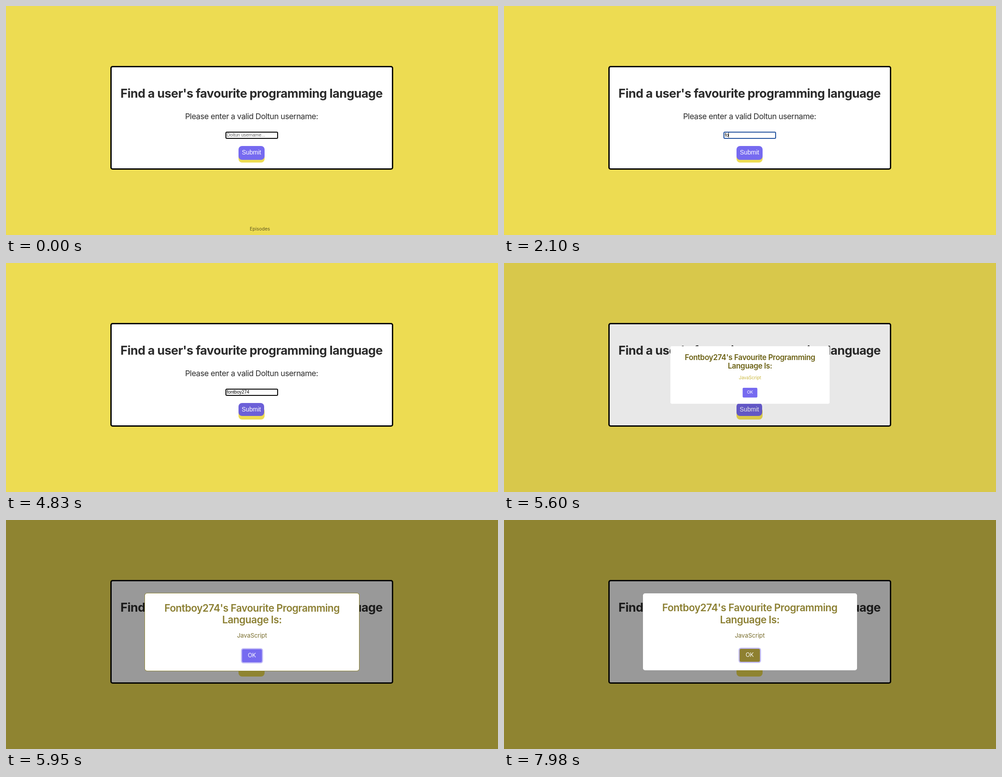
Recreate the animation shown at these times as an HTML page. Size 1094 by 512 pixels, loop 8000 ms.

```html
<!DOCTYPE html>
<html lang="en">
<head>
<meta charset="utf-8">
<title>Favourite language</title>
<style>
* { box-sizing: border-box; margin: 0; }
html, body { width: 100%; height: 100%; overflow: hidden; }
body { position: relative; background: #eddc52; font-family: Inter, sans-serif; color: #2b2b2b; }
body > *, #popup > *, #submit > * { position: absolute; }
.text { white-space: nowrap; text-align: center; }
#card { left: 232px; top: 134px; width: 629px; height: 232px; background: #fff; border: 3px solid #000; border-radius: 5px; }
#heading { left: 232px; top: 176px; width: 628px; font: 700 27px/40px Inter, sans-serif; letter-spacing: -.02em; }
#prompt { left: 232px; top: 232px; width: 628px; font-size: 17.5px; line-height: 29px; letter-spacing: -.026em; }
#field { left: 488px; top: 281px; width: 117px; height: 16px; padding-left: 1px; background: #fff; border: 2px solid #000; border-radius: 3px; font: 10.1px/12px "Liberation Sans", Arial, sans-serif; white-space: pre; }
#value { display: inline-block; height: 12px; }
#caret { display: inline-block; width: 1px; height: 11px; background: #000; vertical-align: top; }
#submit { left: 517px; top: 313px; width: 58px; height: 37px; }
#shade { left: 0; top: 10px; width: 58px; height: 27px; background: #eddc52; border-radius: 8px; }
#face { left: 0; top: 0; width: 58px; height: 31px; border-radius: 8px; color: #fff; font: 13.8px/30px "Liberation Sans", Arial, sans-serif; }
#label { left: 542px; top: 490px; font-size: 10.3px; line-height: 16px; letter-spacing: .1px; color: #5f5720; }
#dim { inset: 0; background: #000; }
#popup { left: 308.5px; top: 163.5px; width: 476px; height: 172.5px; background: #fff; border-radius: 4.7px; }
#title { left: 0; top: 19.5px; width: 476px; font-size: 22.4px; font-weight: 600; line-height: 26.8px; letter-spacing: -.022em; }
#answer { left: 0; top: 84px; width: 476px; font-size: 13.5px; line-height: 20px; letter-spacing: -.01em; }
#ok { left: 215.5px; top: 124.5px; width: 44.5px; height: 29px; border-radius: 3px; color: #fff; font-size: 12.8px; line-height: 28.5px; letter-spacing: -.3px; }
</style>
</head>
<body>
<div id="card"></div>
<div id="heading" class="text">Find a user's favourite programming language</div>
<div id="prompt" class="text">Please enter a valid Doltun username:</div>
<div id="field"><span id="value"></span><span id="caret"></span></div>
<div id="submit"><div id="shade"></div><div id="face" class="text">Submit</div></div>
<div id="label" class="text">Episodes</div>
<div id="dim"></div>
<div id="popup">
  <div id="title" class="text">Fontboy274's Favourite Programming<br>Language Is:</div>
  <div id="answer" class="text">JavaScript</div>
  <div id="ok" class="text">OK</div>
</div>
<script>
const LOOP = 8000, STEP = 70, OPEN = 5600, HOVER_OK = 7070;
const user = 'fontboy274';
const keyTimes = [2100, 2100, 2240, 2380, 2870, 2940, 3080, 3290, 3430, 3560];
const bounce = [.744, 1.014, 1.02, .952, .998, 1];
const style = id => document.getElementById(id).style;
const within = (t, a, b) => t >= a && t < b;
const show = (id, on) => style(id).visibility = on ? 'visible' : 'hidden';

function draw(t) {
  const typed = user.slice(0, keyTimes.filter(k => k <= t).length);
  const value = document.getElementById('value');
  value.textContent = typed || 'Doltun username...';
  value.style.color = typed ? '#000' : '#666';
  // The caret stands before the placeholder, after typed text
  style('caret').position = typed ? 'static' : 'absolute';
  style('caret').left = '1px';
  show('caret', within(t, 1260, 1760) || within(t, 2100, 4060));
  style('field').borderColor = within(t, 1260, 4550) ? '#1f4f9c' : '#000';
  show('label', t < STEP);

  const step = Math.floor((t - OPEN) / STEP);
  const open = step >= 0, settled = step > 0;
  const hover = t >= 4340, pressed = within(t, 4550, 4760);
  const face = style('face');
  face.background = settled ? '#eddc52' : hover ? '#6c60d8' : '#766af0';
  face.height = hover ? '29px' : '31px';
  face.width = hover ? '57px' : '58px';
  face.transform = pressed ? 'translateY(4px)' : 'none';

  style('dim').opacity = settled ? .4 : open ? .09 : 0;
  show('popup', open);
  if (!open) return;
  const popup = style('popup');
  popup.transform = `scale(${bounce[Math.min(step, bounce.length - 1)]})`;
  popup.boxShadow = settled && t < HOVER_OK ? '0 0 0 1px #8e8431' : 'none';
  style('title').color = settled ? '#8b7f32' : '#6b6114';
  style('answer').color = settled ? '#7b7030' : '#cbb83d';
  const ok = style('ok');
  ok.background = t >= HOVER_OK ? '#8e8030' : '#766af0';
  ok.boxShadow = settled ? '0 0 0 2.5px #c0b9f6' : 'none';
}

function frame() {
  draw(performance.now() % LOOP);
  requestAnimationFrame(frame);
}
frame();
</script>
</body>
</html>
```
